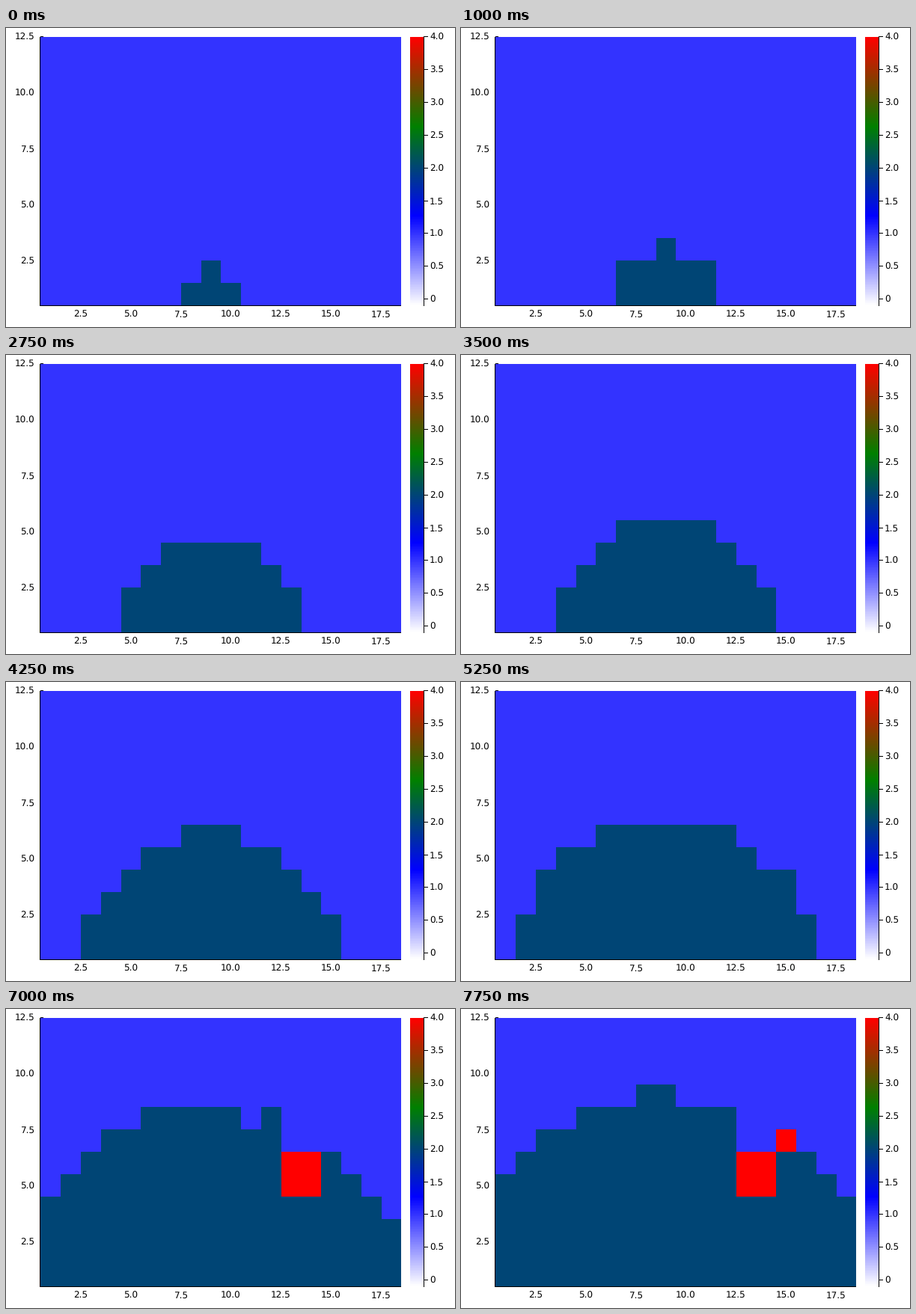
Write a matplotlib script that moves like this. It is 600 px wide and 400 px high and loops after 8 s.

```python
import matplotlib.pyplot as plt
import numpy as np
from matplotlib.animation import FuncAnimation
from matplotlib.colors import LinearSegmentedColormap
from matplotlib.patches import Rectangle

plt.rcParams["font.family"] = "DejaVu Sans"
plt.rcParams["text.hinting"] = "none"

W, H, DPI = 600, 400, 100
COLS, ROWS, STEPS = 18, 12, 32
LEFT, RIGHT, TOP, BOTTOM = 46, 528, 12, 371
BAR_LEFT, BAR_RIGHT = 540, 558
AXIS_BOTTOM, AXIS_HEIGHT = 371.5, 360
LOW, HIGH = -0.1, 4.0

EMPTY, GROWN, HOT = 1, 2, 4
HOT_STEP, FILL_STEP = 24, 28

row, col = np.mgrid[1:ROWS + 1, 1:COLS + 1]
pace = np.random.default_rng(4).uniform(0.96, 1.04, row.shape)

# The hot patch starts on a diagonal and shelters the cells above it.
diagonal = (col - row == 8) & (row >= 5)
block = (abs(col - 13.5) < 1) & (abs(row - 5.5) < 1)
sheltered = (abs(col - 13.5) < 1) & (row > 6)


def grid_at(step):
    """A half ellipse that widens and rises, each cell at its own pace."""
    time = step * pace
    reach = 1.5 + 0.29 * time
    height = 2 + 0.317 * time ** 0.9
    filled = ((col - 9) / reach) ** 2 + (row / height) ** 2 <= 1
    filled &= ~sheltered
    if step < FILL_STEP:
        filled &= diagonal | ~block
    grid = np.where(filled, GROWN, EMPTY)
    if step >= HOT_STEP:
        grid[filled & (diagonal | block)] = HOT
    return grid


fig = plt.figure(figsize=(W / DPI, H / DPI), dpi=DPI, facecolor="white")
ax = fig.add_axes([0, 0, 1, 1])
ax.axis("off")

cmap = LinearSegmentedColormap.from_list(
    "heat", ["white", "blue", "green", "red"], N=256)
style = dict(cmap=cmap, vmin=LOW, vmax=HIGH, antialiased=False,
             edgecolors="none", zorder=2)

x_edges = np.ceil(np.linspace(LEFT, RIGHT, COLS + 1))
y_edges = np.maximum(BOTTOM - 30 * np.arange(ROWS + 1), TOP)
mesh = ax.pcolormesh(x_edges, y_edges, grid_at(0), **style)

levels = np.linspace(LOW, HIGH, 256)[:, None]
ax.pcolormesh([BAR_LEFT, BAR_RIGHT], np.linspace(BOTTOM, TOP, 257), levels,
              **style)


def bar(x, y, width=1, height=1):
    ax.add_patch(Rectangle((x, y), width, height, color="black", lw=0,
                           antialiased=False, zorder=3))


def label(x, baseline, text, ha):
    ax.text(x, baseline, text, ha=ha, va="baseline",
            fontsize=12 * 72 / DPI, color="black")


bar(LEFT - 1, TOP, height=BOTTOM - TOP + 1)
bar(LEFT - 1, BOTTOM, width=RIGHT - LEFT + 1)
bar(LEFT, TOP - 1, width=4)
bar(BAR_RIGHT, TOP, height=BOTTOM - TOP + 1)

for value in np.arange(2.5, 18, 2.5):
    x = LEFT + (value - 0.5) * (RIGHT - LEFT) / COLS
    label(x, 387, f"{value:.1f}", "center")
for value in np.arange(2.5, 13, 2.5):
    y = AXIS_BOTTOM - AXIS_HEIGHT * (value - 0.5) / ROWS
    label(38, y + 4.5, f"{value:.1f}", "right")
for value in np.arange(0, 4.1, 0.5):
    y = AXIS_BOTTOM - AXIS_HEIGHT * (value - LOW) / (HIGH - LOW)
    bar(BAR_RIGHT, np.floor(y), width=6)
    label(566, np.floor(y) + 5, f"{value:.1f}" if value else "0", "left")

ax.set_xlim(0, W)
ax.set_ylim(H, 0)


def draw(step):
    mesh.set_array(grid_at(step))
    return [mesh]


anim = FuncAnimation(fig, draw, frames=STEPS, interval=250, repeat=True,
                     repeat_delay=0)
plt.show()
```
